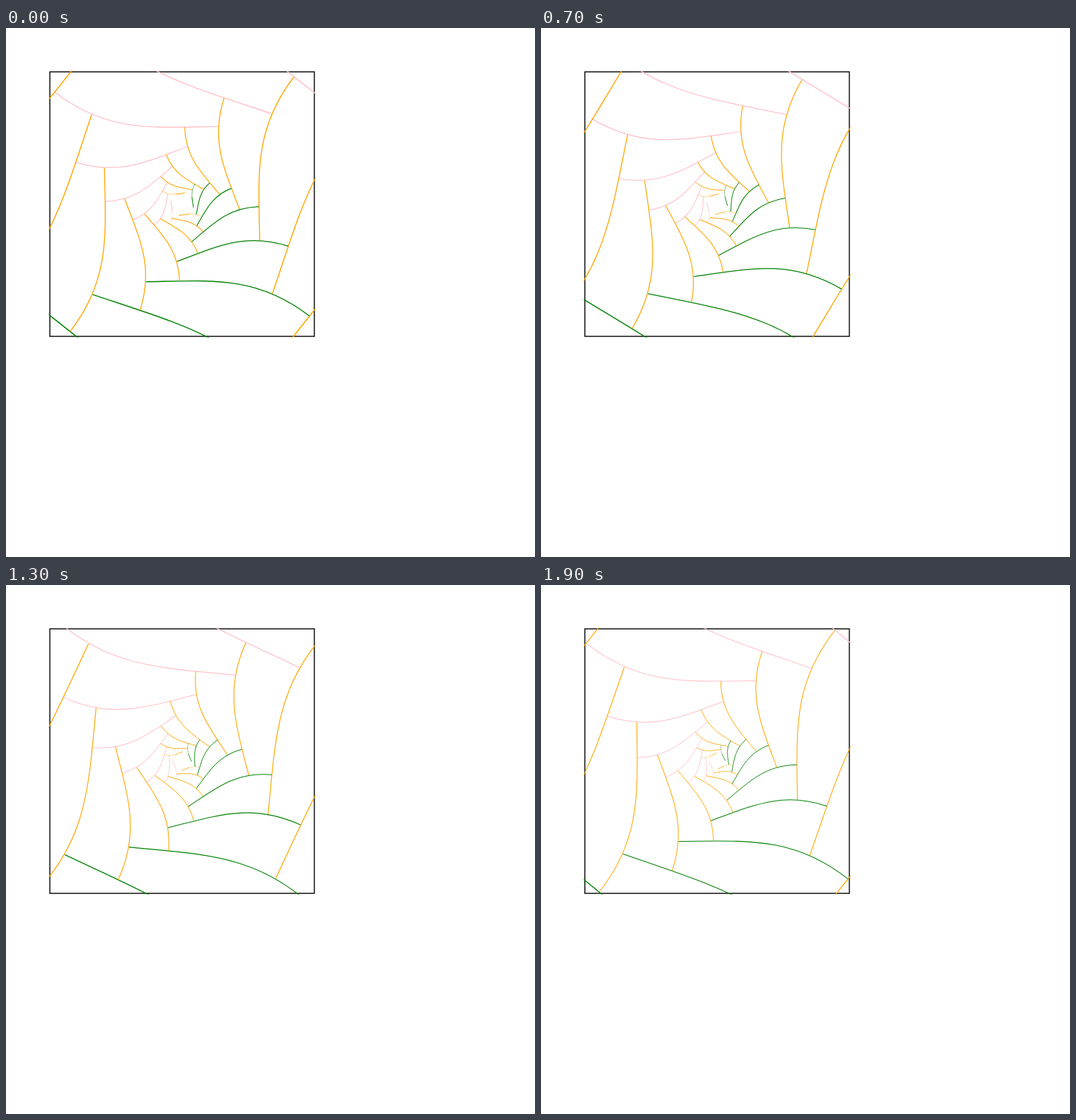
An HTML page with a canvas for the animation above (2 s loop, 748x748 px).

```html
<!DOCTYPE html>
<html lang="en">
<head>
<meta charset="utf-8">
<title>Spiral pinwheel</title>
<style>
  html, body { margin: 0; width: 100%; height: 100%; overflow: hidden; background: #fff; }
  canvas { display: block; }
</style>
</head>
<body>
<canvas id="stage" width="748" height="748"></canvas>
<script>
const ctx = document.getElementById('stage').getContext('2d');
const DEG = Math.PI / 180;
const CENTER = 249;
const HALF_BOX = 187;
const STEPS = 20;
const STEP_MS = 100;

// Each ring is the previous one, shrunk and turned.
const RING_SCALE = 0.6737;
const RING_TURN = -19.7 * DEG;
const FIRST_RING = -4;
const LAST_RING = 5;
const ARM_COLORS = ['pink', 'orange', 'green', 'orange'];

function traceCurve(scale, angle) {
  const c = scale * Math.cos(angle), s = scale * Math.sin(angle);
  ctx.setTransform(c, s, -s, c, CENTER, CENTER);
  ctx.beginPath();
  ctx.moveTo(-180, -158.2);
  ctx.bezierCurveTo(-105, -100.5, -40, -108.2, 51.2, -109.8);
  ctx.resetTransform();
}

// The outer part of the innermost curves breaks up into dots.
function innerDash(zoom) {
  return [...Array(18).fill(zoom), 100, 0];
}

function draw(step) {
  const zoom = 1 - 0.3 * step / (STEPS - 1);
  const turn = -step * DEG;

  ctx.resetTransform();
  ctx.fillStyle = '#fff';
  ctx.fillRect(0, 0, 748, 748);
  ctx.strokeStyle = '#000';
  ctx.lineWidth = 1.4;
  ctx.strokeRect(CENTER - HALF_BOX, CENTER - HALF_BOX, 2 * HALF_BOX, 2 * HALF_BOX);

  ctx.save();
  ctx.beginPath();
  ctx.rect(60.5, 60.5, 377, 377);
  ctx.clip();
  ARM_COLORS.forEach((color, arm) => {
    ctx.strokeStyle = color;
    for (let ring = FIRST_RING; ring <= LAST_RING; ring++) {
      const ringScale = RING_SCALE ** ring;
      traceCurve(zoom * ringScale, turn + ring * RING_TURN + arm * Math.PI / 2);
      ctx.lineWidth = 1.35 * zoom ** 0.8 * ringScale ** 0.15;
      ctx.setLineDash(ring === LAST_RING ? innerDash(zoom) : []);
      ctx.stroke();
    }
  });
  ctx.restore();
}

function tick() {
  draw(Math.floor(performance.now() / STEP_MS) % STEPS);
  requestAnimationFrame(tick);
}
tick();
</script>
</body>
</html>
```
